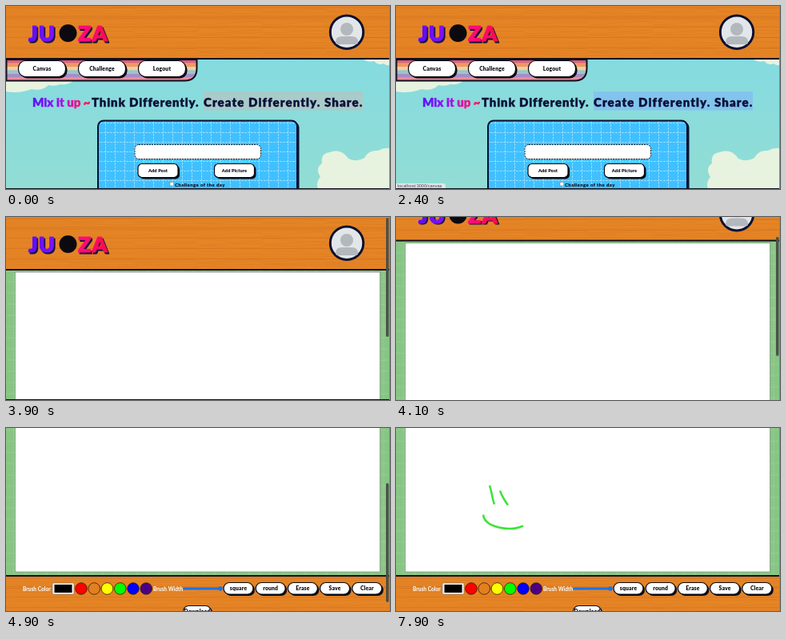
Animation, 480 px wide and 229 px high, one loop 8 s. Source, as an HTML page:

```html
<!DOCTYPE html>
<html lang="en">
<head>
<meta charset="utf-8">
<title>Drawing app</title>
<style>
html, body { margin: 0; width: 100%; height: 100%; overflow: hidden; background: #e68526; }
svg { display: block; width: 480px; height: 229px; }
text { font-family: Lato, "Open Sans", sans-serif; font-weight: 900; fill: #0a0a14; }
.mid { text-anchor: middle; letter-spacing: .15px; }
.title { font-size: 15px; letter-spacing: .85px; fill: #0b1038; stroke: #0b1038; stroke-width: .4px; }
.wide { letter-spacing: 1.1px; }
.tag { font-size: 15px; fill: url(#tag); stroke: url(#tag); stroke-width: .4px; }
.brand { font-size: 27px; letter-spacing: 1px; stroke-width: 1px; stroke-linejoin: round; }
.label { font-size: 6.6px; font-weight: 700; fill: #fff; }
.status text { font: 5.6px "Liberation Sans", Arial, sans-serif; fill: #445; }
.grain { fill: none; stroke: #bd6416; }

.home, .board, .bar, .status, .focus, .scroll, .edge, .ink path { animation: 8s linear infinite; }
.home { animation-name: leave; }
.board { animation-name: enter; }
.focus { animation-name: focus; }
.status { animation-name: hover; }
.scroll { animation-name: scroll; }
.bar { animation-name: thumb; }
.edge { animation-name: edge; }
@keyframes leave { 0%, 41.24% { visibility: visible; } 41.25%, 100% { visibility: hidden; } }
@keyframes enter { 0%, 41.24% { visibility: hidden; } 41.25%, 100% { visibility: visible; } }
@keyframes edge { 0%, 49.5% { visibility: visible; } 49.51%, 100% { visibility: hidden; } }
@keyframes focus { 0%, 22.49% { fill: #a9cbc9; } 22.5%, 100% { fill: #82c4ee; } }
@keyframes hover { 0%, 27.49% { opacity: 0; } 27.5%, 100% { opacity: 1; } }
@keyframes scroll {
  0%, 49.5% { transform: translateY(0); }
  52.5% { transform: translateY(-62px); }
  55% { transform: translateY(-97px); }
  60%, 100% { transform: translateY(-106.5px); }
}
@keyframes thumb {
  0%, 46.2% { transform: translateY(0); opacity: 0; }
  47.5%, 49.5% { transform: translateY(0); opacity: 1; }
  52.5% { transform: translateY(40px); }
  55% { transform: translateY(62px); }
  60% { transform: translateY(68px); }
  66% { transform: translateY(68px); opacity: 1; }
  69%, 100% { transform: translateY(68px); opacity: 0; }
}

.ink path { fill: none; stroke: #3fe23a; stroke-width: 2.5; stroke-dasharray: 1 2; stroke-dashoffset: 1.05; }
.ink .eye1 { animation-name: eye1; }
.ink .eye2 { animation-name: eye2; }
.ink .mouth { animation-name: mouth; }
@keyframes eye1 { 0%, 80% { stroke-dashoffset: 1.05; } 83.75%, 100% { stroke-dashoffset: 0; } }
@keyframes eye2 { 0%, 87.5% { stroke-dashoffset: 1.05; } 91.25%, 100% { stroke-dashoffset: 0; } }
@keyframes mouth { 0%, 93.75% { stroke-dashoffset: 1.05; } 98.7%, 100% { stroke-dashoffset: 0; } }
</style>
</head>
<body>
<svg viewBox="0 0 480 229">
  <defs>
    <linearGradient id="sky" x2="0" y2="1">
      <stop stop-color="#85dbe0"/><stop offset="1" stop-color="#92ddd4"/>
    </linearGradient>
    <linearGradient id="tag" gradientUnits="userSpaceOnUse" x1="33" x2="104">
      <stop stop-color="#5a12ff"/><stop offset=".5" stop-color="#a010f0"/><stop offset=".75" stop-color="#f01090"/><stop offset="1" stop-color="#ff1050"/>
    </linearGradient>
    <linearGradient id="brand" gradientUnits="userSpaceOnUse" x1="28" x2="126">
      <stop stop-color="#5a0cff"/><stop offset=".35" stop-color="#8410ff"/>
      <stop offset=".65" stop-color="#ff0a80"/><stop offset="1" stop-color="#ff0a50"/>
    </linearGradient>
    <pattern id="grid" width="12" height="12" patternUnits="userSpaceOnUse" x="118" y="140">
      <path d="M0 6.5H12M6.500 0V12" stroke="#b4e6ff" stroke-width=".8" stroke-dasharray="2.800 1.200"/>
    </pattern>
    <pattern id="mat" width="14" height="14" patternUnits="userSpaceOnUse" x="3" y="4">
      <path d="M0 7H14M7 0V14" stroke="#a8d8a4" stroke-width=".7" stroke-dasharray="2 1.500"/>
    </pattern>
    <clipPath id="face"><circle cx="426" cy="33" r="19.500"/></clipPath>
    <clipPath id="nav"><path d="M0 66H239V78Q239 94 223 94H0Z"/></clipPath>
    <g id="name"><text x="28" y="44" class="brand" style="fill:inherit">JU</text><text x="90" y="44" class="brand" style="fill:inherit">ZA</text></g>
    <g id="header">
      <rect width="480" height="66" fill="#e68526"/>
      <g class="grain" data-top="0" data-height="65"></g>
      <rect y="65" width="480" height="2" fill="#10101c"/>
      <use href="#name" x="1.800" y="1.600" fill="#16103a" stroke="#16103a"/>
      <use href="#name" fill="url(#brand)" stroke="url(#brand)"/>
      <circle cx="77.500" cy="34" r="11" fill="#0c0a10"/>
      <circle cx="426" cy="32.700" r="20.700" fill="#e3e6e9" stroke="#0a1030" stroke-width="3"/>
      <g clip-path="url(#face)" fill="#b3b8bd">
        <circle cx="426" cy="29" r="8"/>
        <path d="M412 48V45Q412 38 420 38H432Q440 38 440 45V48Z"/>
      </g>
    </g>
  </defs>

  <g class="home">
    <rect y="66" width="480" height="163" fill="url(#sky)"/>
    <g fill="#e7f3df">
      <path d="M0 94H84Q78 99 68 98Q61 101 53 99Q45 107 32 104Q16 110 0 107Z"/>
      <path d="M447 67Q453 71 460 69Q466 75 472 72Q476 75 480 74V67Z"/>
      <path d="M390 229Q387 220 393 214Q386 203 395 197Q393 184 405 183Q419 178 428 191Q439 196 448 190Q453 180 465 181Q472 177 480 178V229Z"/>
    </g>
    <use href="#header"/>
    <g clip-path="url(#nav)" id="stripes"></g>
    <path d="M.5 67H238.500V78Q238.500 93.500 223 93.500H.5Z" fill="none" stroke="#10101c" stroke-width="2"/>
    <g id="menu"></g>

    <rect class="focus" x="247" y="107" width="199" height="23.500"/>
    <text class="tag" x="33" y="126">Mix it up ~</text>
    <text class="title" x="107" y="126">Think Differently.</text>
    <text class="title wide" x="247" y="126">Create Differently. Share.</text>

    <rect x="117" y="145" width="249.500" height="100" rx="7" fill="#0a1030"/>
    <rect x="115" y="143.500" width="249" height="100" rx="7" fill="#40c0ff"/>
    <rect x="115" y="143.500" width="249" height="100" rx="7" fill="url(#grid)" stroke="#0a1030" stroke-width="2"/>
    <rect x="161" y="173.500" width="157.500" height="18" rx="5" fill="#fff" stroke="#10101c" stroke-dasharray="2 1.200"/>
    <g id="post"></g>
    <rect x="205" y="220.500" width="4.500" height="4.500" rx="1" fill="#fff" stroke="#777" stroke-width=".5"/>
    <text x="211" y="226" font-size="6" letter-spacing=".4">Challenge of the day</text>
    <g class="status">
      <path d="M0 222H59Q62 222 62 225V229H0Z" fill="#dfe8ea"/>
      <text x="2" y="227.300">localhost:3000/canvas</text>
    </g>
  </g>

  <g class="board">
    <g class="scroll">
      <rect y="66" width="480" height="226" fill="#87c584"/>
      <rect y="66" width="480" height="226" fill="url(#mat)"/>
      <use href="#header"/>
      <rect x="11.500" y="69" width="456" height="217.500" fill="#fff" stroke="#8a938a" stroke-width=".8"/>
      <rect y="291" width="480" height="46" fill="#e68526"/>
      <g class="grain" data-top="292" data-height="44"></g>
      <rect y="290.500" width="480" height="2" fill="#10101c"/>
      <text class="label" x="21" y="310">Brush Color</text>
      <rect x="58" y="300.500" width="27" height="14" rx="1" fill="#f2f2f2" stroke="#777" stroke-width=".6"/>
      <rect x="60.500" y="302.500" width="22" height="10"/>
      <g id="paints" stroke="#33200c" stroke-width=".8"></g>
      <text class="label" x="184" y="310">Brush Width</text>
      <rect x="221" y="306" width="48" height="3" rx="1.500" fill="#1a73e8"/>
      <circle cx="268" cy="307.500" r="2.800" fill="#1a73e8"/>
      <g id="tools"></g>
      <g class="ink" transform="translate(0 106.500)">
        <path class="eye1" pathLength="1" d="M117 72Q119 78 120 84T123 95.500"/>
        <path class="eye2" pathLength="1" d="M130 78.500Q132 84 135 89T140 96.500"/>
        <path class="mouth" pathLength="1" d="M109 108.500C110 117 118 122 129 124.500S150 126.500 159 122.500"/>
      </g>
    </g>
    <rect class="bar" x="475" y="1" width="3.500" height="149" rx="1.700" fill="#4c5048"/>
  </g>
  <rect class="edge" y="228" width="480" height="1" fill="#10101c"/>
  <rect x="479" width="1" height="229" fill="#c87a30"/>
</svg>
<script>
const NS = 'http://www.w3.org/2000/svg';
const $ = id => document.getElementById(id);

function add(parent, tag, attrs, label) {
  const el = document.createElementNS(NS, tag);
  for (const key in attrs) el.setAttribute(key, attrs[key]);
  if (label) el.textContent = label;
  parent.append(el);
}

function button(parent, x, y, width, height, radius, size, label) {
  const box = { width, height, rx: radius };
  add(parent, 'rect', { ...box, x: x + 2, y: y + 2, fill: '#0a0a14' });
  add(parent, 'rect', { ...box, x, y, fill: '#fff', stroke: '#0a0a14', 'stroke-width': 1.2 });
  add(parent, 'text', { x: x + width / 2, y: y + height / 2 + size * .33, class: 'mid', 'font-size': size }, label);
}

let seed = 7;
const random = () => (seed = seed * 16807 % 2147483647) / 2147483647;

// Wavy wood grain with a stronger seam between boards.
for (const g of document.querySelectorAll('.grain')) {
  const top = +g.dataset.top, height = +g.dataset.height;
  for (let y = 2; y < height - 1; y += 2.2) {
    const seam = y % 13 < 2.2;
    let d = `M0 ${top + y}`;
    for (let x = 40; x <= 480; x += 40) d += `T${x} ${(top + y + (seam ? 0 : random() * 1.6 - .8)).toFixed(1)}`;
    add(g, 'path', { d, 'stroke-width': seam ? .8 : .6, opacity: seam ? .55 : .1 + random() * .2 });
  }
}

['#e0607a', '#ee9868', '#f3cf9c', '#9cc4cc', '#a68ec4', '#ec8c9c'].forEach((fill, i) =>
  add($('stripes'), 'rect', { y: 67 + i * 4.5, width: 240, height: 4.6, fill }));

['Canvas', 'Challenge', 'Logout'].forEach((label, i) =>
  button($('menu'), 15.5 + i * 75, 68.5, 59, 20, 9, 6.8, label));

['Add Post', 'Add Picture'].forEach((label, i) =>
  button($('post'), 165 + i * 95.5, 197.5, 50, 17, 5, 5.6, label));

['#f00', '#e08020', '#ff0', '#0f0', '#00f', '#4b0082'].forEach((fill, i) =>
  add($('paints'), 'circle', { cx: 94 + i * 16.25, cy: 307.5, r: 7.3, fill }));

['square', 'round', 'Erase', 'Save', 'Clear'].forEach((label, i) =>
  button($('tools'), 272 + i * 40.2, 300, 37, 14.5, 7.2, 6.8, label));
button($('tools'), 221.5, 329, 35, 15, 7, 6.8, 'Download');
</script>
</body>
</html>
```
